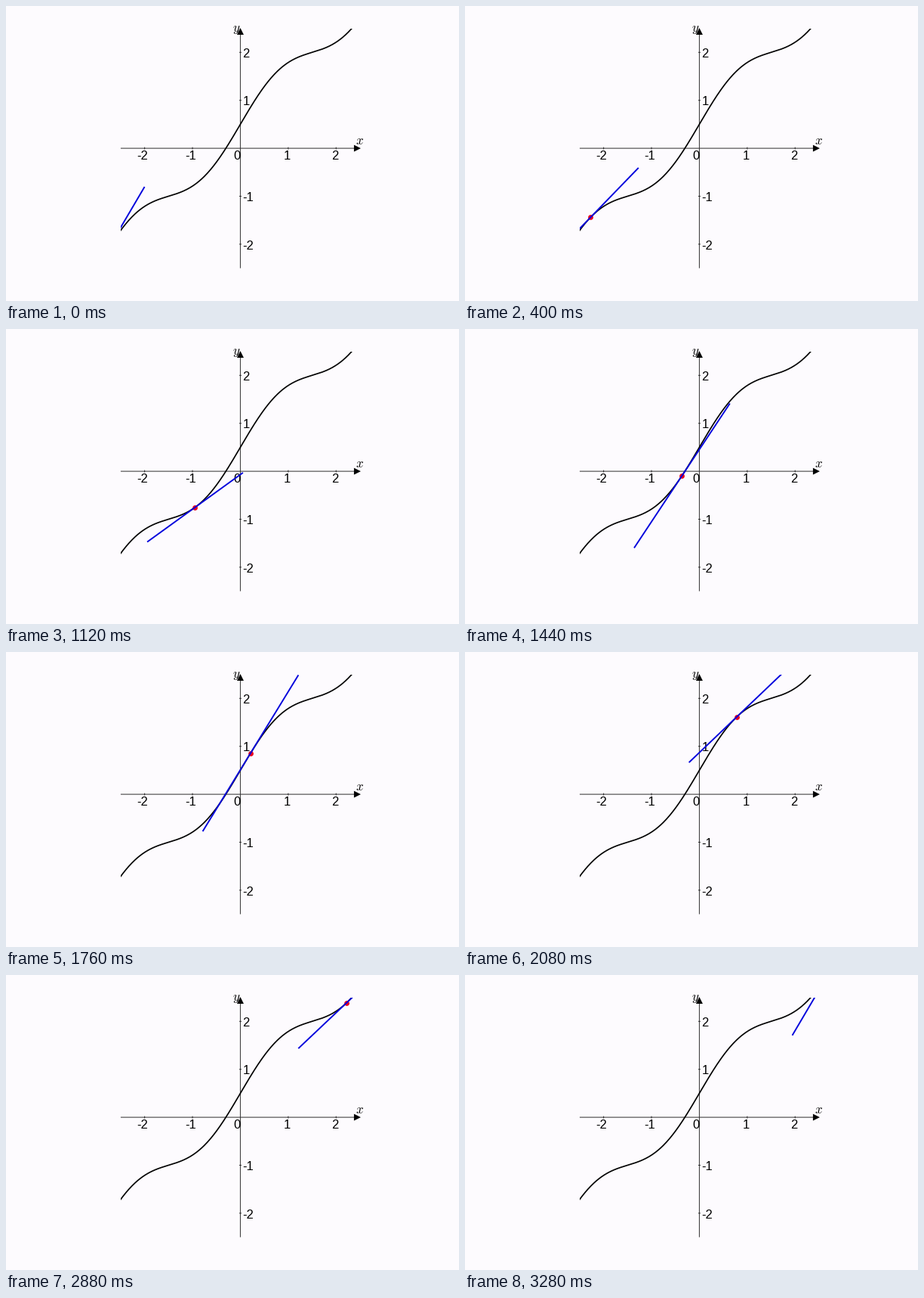
Write a matplotlib script that moves like this. It is 600 px wide and 390 px high and loops after 3320 ms.

```python
import numpy as np
import matplotlib.pyplot as plt
from matplotlib.animation import FuncAnimation
from matplotlib.patches import Polygon, Rectangle

W, H, DPI = 600, 390, 100
PX = 72 / DPI                    # points per pixel
FRAMES, INTERVAL = 83, 40
OX, OY, UNIT = 310.4, 188.1, 63.4
LIMIT = 2.5 * UNIT
K = 2 * np.pi / 3

plt.rcParams["mathtext.fontset"] = "cm"


def f(x):
    return x + 0.5 + np.sin(K * x) / 3


def slope(x):
    return 1 + K * np.cos(K * x) / 3


def to_px(x, y):
    return OX + UNIT * x, OY - UNIT * y


def contact_x(i):
    """Point of contact: a nearly even sweep from left to right."""
    return -2.985 + 0.0724 * i - 0.016 * np.cos(2 * np.pi * i / 72)


fig = plt.figure(figsize=(W / DPI, H / DPI), dpi=DPI, facecolor="#fdfbfe")
ax = fig.add_axes([0, 0, 1, 1])
ax.set_xlim(0, W)
ax.set_ylim(H, 0)
ax.axis("off")

window = Rectangle((OX - LIMIT, OY - LIMIT), 2 * LIMIT, 2 * LIMIT,
                   transform=ax.transData)


def line(xs, ys, color="black", width=1.0, **kw):
    return ax.plot(xs, ys, color=color, lw=width * PX, snap=False,
                   solid_capstyle="butt", **kw)[0]


def label(x, y, text, size=16.5, **kw):
    ax.text(x, y, text, fontsize=size * PX, color="black",
            family="Liberation Sans", va="baseline", zorder=2, **kw)


# Axes with arrowheads
GREY = "#303030"
line([OX - LIMIT, OX + LIMIT - 4], [OY, OY], GREY)
line([OX, OX], [OY - LIMIT + 4, OY + LIMIT], GREY)
tip_x, tip_y = OX + LIMIT + 1, OY - LIMIT - 0.6
for head in ([(tip_x, OY), (tip_x - 9, OY - 4.5), (tip_x - 9, OY + 4.5)],
             [(OX, tip_y), (OX - 4.5, tip_y + 9), (OX + 4.5, tip_y + 9)]):
    ax.add_patch(Polygon(head, fc="black", ec="none", zorder=2))

# Ticks and numbers
for n in (-2, -1, 1, 2):
    tx, ty = to_px(n, n)
    line([tx, tx], [OY - 1.5, OY + 1.5], GREY)
    line([OX - 1.5, OX + 1.5], [ty, ty], GREY)
    label(tx - (2.6 if n < 0 else 1.4), 202.7, f"{n}", ha="center")
    label(OX + 3, ty + 6.6, f"{n}", ha="left")
label(305.5, 202.7, "0", ha="center")
label(468.8, 182.7, "$x$", 17, ha="center")
label(305.4, 34, "$y$", 17, ha="center")

xs = np.linspace(-2.6, 2.6, 400)
curve = line(*to_px(xs, f(xs)), width=1.7, zorder=3)
dot = ax.plot([], [], "o", color="#e80020", ms=6.8 * PX, mew=0, zorder=4,
              snap=False)[0]
tangent = line([], [], "#0000dc", 1.9, zorder=5)
for part in (curve, dot, tangent):
    part.set_clip_path(window)


def draw(i):
    x = contact_x(i)
    y, m = f(x), slope(x)
    px, py = to_px(x, y)
    dot.set_data([px], [py])
    tangent.set_data(*to_px(x + np.array([-1, 1]), y + m * np.array([-1, 1])))
    return dot, tangent


anim = FuncAnimation(fig, draw, frames=FRAMES, interval=INTERVAL,
                     repeat=True, repeat_delay=0)
plt.show()
```
